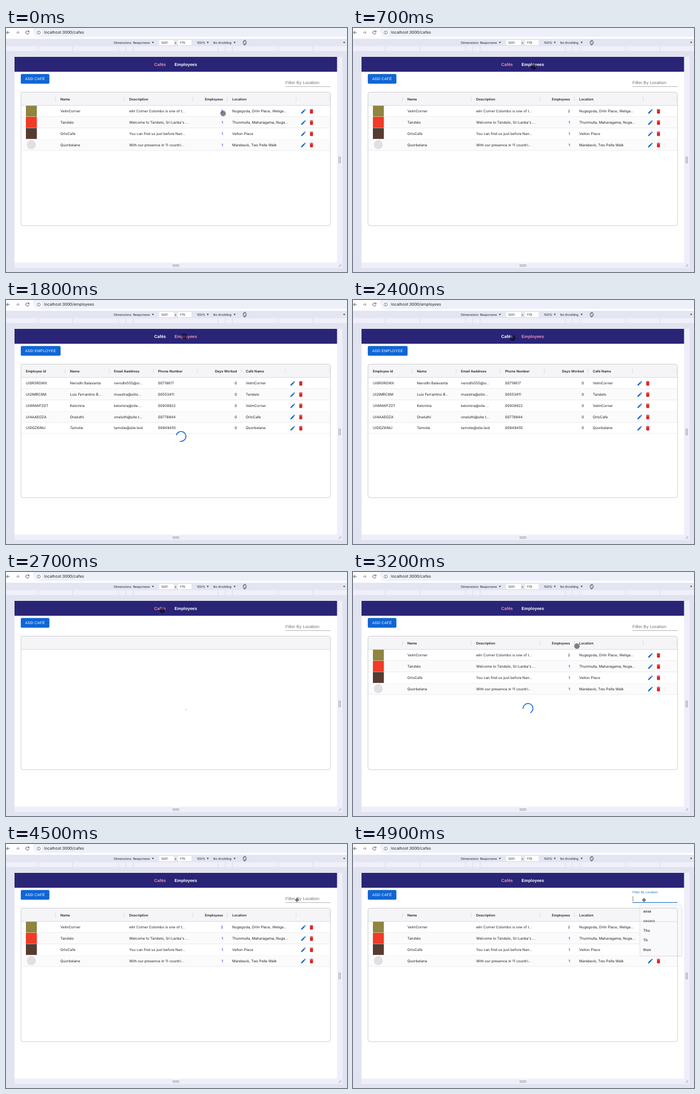
Animation, 600 px wide and 431 px high, one loop 5000 ms. Source, as an HTML page:

```html
<!DOCTYPE html>
<html lang="en">
<head>
<meta charset="utf-8">
<title>Café admin</title>
<style>
  html, body { margin: 0; width: 100%; height: 100%; overflow: hidden; }
  svg { display: block; width: 100vw; height: 100vh; }
  text { font-family: Inter, sans-serif; white-space: pre; text-rendering: geometricPrecision; }
  .arial { font-family: "Liberation Sans", Arial, sans-serif; }
</style>
</head>
<body>
<svg id="stage" viewBox="0 0 600 431" preserveAspectRatio="none"></svg>
<script>
const LOOP = 5000, STEP = 100;
const PINK = '#ee8fc4', BLUE = '#1066d3', INK = '#202124';
const EDIT = 'M3 17.25V21h3.75L17.81 9.94l-3.75-3.75L3 17.25zM20.71 7.04c.39-.39.39-1.02 0-1.41l-2.34-2.34a1 1 0 0 0-1.41 0l-1.83 1.83 3.75 3.75 1.83-1.83z';
const BIN = 'M6 19c0 1.1.9 2 2 2h8c1.1 0 2-.9 2-2V7H6v12zM19 4h-3.5l-1-1h-5l-1 1H5v2h14V4z';
const GRID_TOP = 137, ROW = 19.8;
const stage = document.getElementById('stage');

function add(parent, tag, attrs = {}, content) {
  const node = document.createElementNS('http://www.w3.org/2000/svg', tag);
  for (const key in attrs) node.setAttribute(key, attrs[key]);
  if (content !== undefined) node.textContent = content;
  return parent.appendChild(node);
}
const group = (parent, attrs) => add(parent, 'g', attrs);
const rect = (parent, x, y, width, height, fill, more) =>
  add(parent, 'rect', { x, y, width, height, fill, ...more });
const path = (parent, d, more) => add(parent, 'path', { d, fill: 'none', ...more });
const circle = (parent, cx, cy, r, more) => add(parent, 'circle', { cx, cy, r, ...more });
// y is the vertical middle of the letters
const label = (parent, text, x, y, size, more) =>
  add(parent, 'text', { x, y: y + size * 0.355, 'font-size': size, fill: INK, ...more }, text);
const show = (node, on) => node.setAttribute('display', on ? 'inline' : 'none');

function drawBrowser() {
  rect(stage, 0, 0, 600, 431, '#e1e4f0');
  rect(stage, 0, 0, 600, 19, '#fdfdff');
  rect(stage, 48, -6, 570, 21.5, '#edf0f9', { rx: 9 });
  const line = { stroke: '#45474c', 'stroke-width': 0.9 };
  path(stage, 'M6.5 8H1M3.6 5.2L.9 8l2.7 2.8', line);
  path(stage, 'M17.5 8H23M20.4 5.2L23.1 8l-2.7 2.8', { ...line, stroke: '#85878d' });
  path(stage, 'M40.1 6.3A2.9 2.9 0 1 0 40.4 9M40.6 4.8V7H38.4', line);
  circle(stage, 57.5, 8, 5.6, { fill: '#fff' });
  circle(stage, 57.5, 8, 3, { fill: 'none', ...line, 'stroke-width': 0.7 });
  path(stage, 'M57.5 7.6V9.6M57.5 6.2V7', { ...line, 'stroke-width': 0.7 });

  const down = (x, y) => path(stage, `M${x - 1.7} ${y - 1.3}h3.4l-1.7 2.8z`, { fill: '#33353a' });
  rect(stage, 0, 19, 600, 13, '#e3e6f2');
  rect(stage, 269.5, 21.3, 26, 8.8, '#fff', { rx: 1 });
  rect(stage, 302.5, 21.3, 24, 8.8, '#fff', { rx: 1 });
  [['Dimensions: Responsive', 190], ['1201', 273], ['×', 296.3], ['770', 305.5],
   ['100%', 336], ['No throttling', 364.5]].forEach(([text, x]) => label(stage, text, x, 25.8, 5.5));
  [258.5, 355, 402.3, 595].forEach(x => down(x, 25.8));
  const turn = group(stage, { transform: 'translate(420 25.8) rotate(40)' });
  rect(turn, -1.6, -2.9, 3.2, 5.8, 'none', { stroke: INK, 'stroke-width': 0.7 });
  path(turn, 'M-3.3 1.6V-2.2A3 3 0 0 1 -1 -4.2M3.3 -1.6V2.2A3 3 0 0 1 1 4.2', { stroke: INK, 'stroke-width': 0.7 });

  rect(stage, 0, 32, 600, 9, '#f0effa');
  [57, 117.5, 198, 210.5, 223.5, 373.5, 386, 398.5, 479.5, 540].forEach(x =>
    rect(stage, x - 0.4, 32, 0.8, 9, '#d5d8e6'));
  rect(stage, 0, 41, 600, 0.6, '#d8dbe8');

  rect(stage, 15, 51, 577, 373, '#efeef9');
  rect(stage, 15, 51, 567.5, 363.5, '#fff');
  const grip = { stroke: '#85878f', 'stroke-width': 0.8 };
  path(stage, 'M586 227v12M588.3 227v12M293 418.5h12M293 420.9h12', grip);
  path(stage, 'M585 421.5l4.5-4.5M587.5 421.8l2.3-2.3', grip);

  rect(stage, 15, 51, 567.5, 26.3, '#2a2476');
  rect(stage, 26.3, 113.4, 544.6, 235.7, '#fff', { rx: 3.5 });
  path(stage, 'M26.3 137V116.9a3.5 3.5 0 0 1 3.5-3.5H567.4a3.5 3.5 0 0 1 3.5 3.5V137z', { fill: '#f5f5f7' });
}

function drawButton(parent, text, width) {
  rect(parent, 26.2, 82.4, width, 17, '#000', { rx: 2, opacity: 0.13 });
  rect(parent, 26, 81.3, width, 17, BLUE, { rx: 2 });
  label(parent, text, 33.8, 89.8, 6.6, { class: 'arial', fill: '#fff', 'letter-spacing': 0.19 });
}

// columns: [title, x, right aligned]
function drawTable(parent, { columns, rows, separators, editX, linkColumn }) {
  separators.forEach(x => rect(parent, x - 0.4, 121.6, 0.8, 7.4, '#d3d5da'));
  const cell = (text, [, x, right], y, size, more) =>
    label(parent, text, x, y, size, { 'text-anchor': right ? 'end' : 'start', ...more });
  columns.forEach(column => cell(column[0], column, 125.4, 6, { 'font-weight': 600 }));
  rows.forEach((row, i) => {
    const top = GRID_TOP + i * ROW, y = top + ROW / 2;
    if (i % 2) rect(parent, 26.8, top, 543.6, ROW, '#fbfbfc');
    rect(parent, 26.8, top + ROW - 0.4, 543.6, 0.6, '#dcdee2');
    row.forEach((text, c) => cell(text, columns[c], y, 6.3,
      c === linkColumn ? { fill: '#2a1fd0', 'font-weight': 500 } : {}));
    const icon = (d, x, fill) => path(parent, d, { fill, transform: `translate(${x - 5.3} ${y - 4.9}) scale(.44)` });
    icon(EDIT, editX, BLUE);
    icon(BIN, editX + 14.2, '#d92626');
  });
}

function drawCafes(parent) {
  drawTable(parent, {
    columns: [['Name', 95.7], ['Description', 216.8], ['Employees', 381.8, true], ['Location', 398]],
    rows: [
      ['VelmCorner', 'elm Corner Colombo is one of t...', '2', 'Nugegoda, Orlin Place, Weliga...'],
      ['Tandelo', "Welcome to Tandelo, Sri Lanka's ...", '1', 'Thunmulla, Maharagama, Nuge...'],
      ['OrloCafe', 'You can find us just before Nan...', '1', 'Velton Place'],
      ['Quorbelane', 'With our presence in 11 countri...', '1', 'Marebeck, Two Pelle Walk'],
    ],
    separators: [87, 208, 329, 389.5, 510.5, 570], editX: 523.3, linkColumn: 2,
  });
  ['#8f8440', '#f33a24', '#573a30'].forEach((fill, i) => rect(parent, 35, GRID_TOP + i * ROW, 19.3, 19.3, fill));
  circle(parent, 44.6, 206.1, 8, { fill: '#dfe0e4' });
}

function drawEmployees(parent) {
  drawTable(parent, {
    columns: [['Employee Id', 35], ['Name', 112.5], ['Email Aaddress', 190], ['Phone Number', 267.5],
      ['Days Worked', 406.3, true], ['Café Name', 422]],
    rows: [
      ['UI0R5RGWX', 'Nerodhi Balavanta', 'nerodhi555@si...', '00718617', '0', 'VelmCorner'],
      ['UI2IMRC8M', 'Luis Ferrantino B...', 'muestra@sitio...', '00553411', '0', 'Tandelo'],
      ['UIWNWFZ0T', 'Kelomira', 'kelomira@site....', '00938822', '0', 'VelmCorner'],
      ['UI4AAEOZA', 'Oneluthi', 'oneluthi@site.t...', '00778844', '0', 'OrloCafe'],
      ['UIDGZ6IMJ', 'Tamolie', 'tamolie@site.test', '00849455', '0', 'Quorbelane'],
    ],
    separators: [104, 181.5, 259, 336.5, 414, 491.5, 570], editX: 504.5,
  });
}

function drawSuggestions(parent) {
  rect(parent, 504.2, 108, 75.4, 91.2, '#000', { rx: 3.5, opacity: 0.06 });
  rect(parent, 504.8, 107.4, 74, 90.2, '#f9f9fc', { rx: 3, stroke: '#dcdde4', 'stroke-width': 0.6 });
  ['assa', 'sasass', 'Thu', 'Th', 'thun'].forEach((text, i) =>
    label(parent, text, 510.7, 118.8 + i * 17, 6.3, { 'font-weight': 500 }));
}

drawBrowser();
const url = label(stage, '', 67, 8, 7);
const navStyle = { class: 'arial', 'font-weight': 700 };
const cafesLink = label(stage, 'Cafés', 260.8, 64.2, 7.5, navStyle);
const employeesLink = label(stage, 'Employees', 296.6, 64.2, 7.5, navStyle);

const cafesPage = group(stage), employeesPage = group(stage);
drawButton(cafesPage, 'ADD CAFÉ', 50.3);
drawButton(employeesPage, 'ADD EMPLOYEE', 70);
const cafesTable = group(cafesPage), employeesTable = group(employeesPage);
drawCafes(cafesTable);
drawEmployees(employeesTable);

rect(stage, 26.3, 136.6, 544.6, 0.7, '#c9ccd2');
rect(stage, 26.3, 113.4, 544.6, 235.7, 'none', { rx: 3.5, stroke: '#bfc3ca', 'stroke-width': 0.8 });

rect(cafesPage, 491.7, 103.1, 79.3, 0.6, '#858585');
const filterLine = rect(cafesPage, 0, 102.8, 0, 1.1, '#1976d2');
const filterLabel = add(cafesPage, 'text', { 'font-size': 7.55, class: 'arial', 'letter-spacing': 0.07 }, 'Filter By Location');
const caret = rect(cafesPage, 492, 92.3, 0.6, 9, '#333');
const suggestions = group(cafesPage);
drawSuggestions(suggestions);

const spinner = group(stage);
const arc = circle(spinner, 0, 0, 20.2, { fill: 'none', stroke: '#1769d2', 'stroke-width': 3.6 });
const dot = circle(stage, 0, 0, 4.7, { fill: '#000', 'fill-opacity': 0.48, stroke: '#000', 'stroke-opacity': 0.2, 'stroke-width': 0.7 });
const cross = path(stage, 'M-3 0H3M0 -3V3M-2 -1.2L-3.2 0L-2 1.2M2 -1.2L3.2 0L2 1.2M-1.2 -2L0 -3.2L1.2 -2M-1.2 2L0 3.2L1.2 2',
  { stroke: '#111', 'stroke-width': 0.9 });

const clamp = v => Math.max(0, Math.min(1, v));
const smooth = v => (v = clamp(v), v * v * (3 - 2 * v));
const mix = (a, b, k) => a + (b - a) * k;

// [time, x, y]
const pointerPath = [
  [0, 382, 151], [100, 382, 151], [800, 314, 64], [2100, 314, 64], [2500, 275, 68],
  [2700, 275, 68], [3200, 394, 131], [4000, 479, 116], [4400, 512, 99], [LOOP, 512, 99],
];
function pointerAt(t) {
  const i = pointerPath.findIndex(p => p[0] > t);
  const [t0, x0, y0] = pointerPath[i - 1], [t1, x1, y1] = pointerPath[i];
  const k = smooth((t - t0) / (t1 - t0));
  return [mix(x0, x1, k), mix(y0, y1, k)];
}

function drawSpinner(age) {
  const phase = age / 1400 % 1;
  const grow = smooth(phase * 2), leave = smooth(phase * 2 - 1);
  arc.setAttribute('stroke-dasharray', `${mix(1, 100, grow)} 200`);
  arc.setAttribute('stroke-dashoffset', -15 * grow - 110 * leave);
  spinner.setAttribute('transform', `translate(308 241) scale(.429) rotate(${phase * 360})`);
}

function render(t) {
  const within = (from, to) => t >= from && t < to;
  const onEmployees = within(1000, 2600);
  url.textContent = 'localhost:3000/' + (onEmployees ? 'employees' : 'cafes');
  cafesLink.setAttribute('fill', onEmployees ? '#fff' : PINK);
  employeesLink.setAttribute('fill', onEmployees ? PINK : '#fff');
  show(cafesPage, !onEmployees);
  show(employeesPage, onEmployees);
  show(employeesTable, t >= 1700);
  show(cafesTable, !within(2600, 3100));

  const spinStart = t < 2600 ? 1200 : 2660;
  show(spinner, within(1200, 2000) || within(2660, 3400));
  drawSpinner(Math.max(0, t - spinStart));

  const focused = t >= 4600, k = smooth((t - 4500) / 200);
  filterLabel.setAttribute('transform', `translate(491.7 ${mix(99, 87.2, k)}) scale(${mix(1, 0.75, k)})`);
  filterLabel.setAttribute('fill', focused ? '#1976d2' : '#707070');
  filterLine.setAttribute('x', 531.35 - 39.65 * k);
  filterLine.setAttribute('width', 79.3 * k);
  show(caret, focused);
  show(suggestions, t >= 4700);

  const overField = t >= 4400;
  for (const node of [dot, cross]) node.setAttribute('transform', `translate(${pointerAt(t)})`);
  show(dot, !overField);
  show(cross, overField);
}

function tick() {
  render(Math.floor(performance.now() % LOOP / STEP) * STEP);
  requestAnimationFrame(tick);
}
tick();
</script>
</body>
</html>
```
